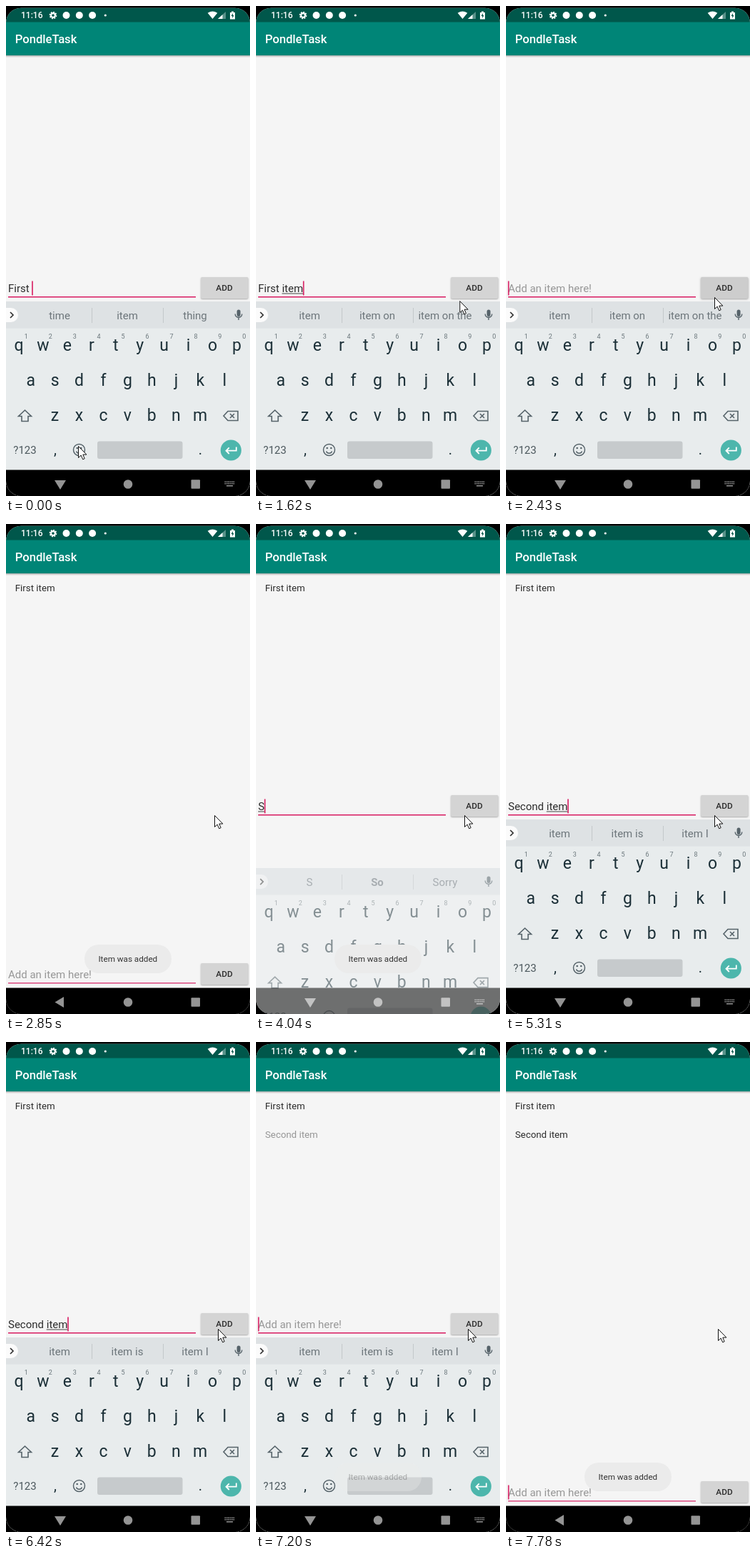
An HTML page with a canvas for the animation above (8000 ms loop, 342 by 685 pixels).

```html
<!DOCTYPE html>
<html lang="en">
<head>
<meta charset="utf-8">
<title>To-do list demo</title>
<style>
  html, body { margin: 0; width: 100%; height: 100%; overflow: hidden; background: #000; }
  canvas { display: block; }
</style>
</head>
<body>
<canvas id="stage" width="342" height="685"></canvas>
<script>
const ctx = document.getElementById('stage').getContext('2d');
const W = 342, H = 685, LOOP = 8000, BLINK = 470;
const PINK = '#d81b60', KEY = '#1b2f37', ICON = '#56636a', INK = '#2c2c2c';

// Times in ms: keyboard opens, first key press, gap between keys, item added.
// "given" letters stand in the field before the first key press.
const tasks = [
  { text: 'First item', open: -400, keys: 280, gap: 75, given: 6, add: 2310 },
  { text: 'Second item', open: 3920, keys: 3920, gap: 138, given: 0, add: 6840 }
];
const suggestions = {
  'First ': 'time|item|thing',
  'First item': 'item|item on|item on the',
  'S': 'S|*So|Sorry',
  'Second ': 'time|one|half',
  'Second item': 'item|item is|item I'
};
// Pointer moves after each added item and before each press: start, duration, dx, dy
const moves = [[1000, 740, 198, -218], [2300, 130, -7, 10], [6080, 340, 5, -6]];

const ramp = (t, start, span) => Math.min(1, Math.max(0, (t - start) / span));
const smooth = u => u * u * (3 - 2 * u);

function box(x, y, w, h, fill, r = 0) {
  ctx.fillStyle = fill;
  ctx.beginPath();
  ctx.roundRect(x, y, w, h, r);
  ctx.fill();
}
function disc(x, y, r, fill) {
  ctx.fillStyle = fill;
  ctx.beginPath();
  ctx.arc(x, y, r, 0, 7);
  ctx.fill();
}
function text(s, x, y, size, fill, align = 'left', weight = 400) {
  ctx.font = `${weight} ${size}px Roboto, sans-serif`;
  ctx.textAlign = align;
  ctx.fillStyle = fill;
  ctx.fillText(s, x, y);
}
// SVG path drawn at an offset, filled and/or stroked
function shape(x, y, d, fill, stroke, width = 1.6) {
  const p = new Path2D(d);
  ctx.save();
  ctx.translate(x, y);
  if (fill) { ctx.fillStyle = fill; ctx.fill(p); }
  if (stroke) { ctx.strokeStyle = stroke; ctx.lineWidth = width; ctx.stroke(p); }
  ctx.restore();
}

function drawTop() {
  box(0, 0, W, 23, '#00574b');
  box(0, 22.5, W, 46.5, '#008577');
  const shade = ctx.createLinearGradient(0, 69, 0, 72);
  shade.addColorStop(0, 'rgba(0,0,0,.3)');
  shade.addColorStop(1, 'rgba(0,0,0,0)');
  box(0, 69, W, 3, shade);
  text('PondleTask', 12.7, 52, 16.6, '#fff', 'left', 500);

  text('11:16', 21, 17, 12, '#fff', 'left', 500);
  ctx.setLineDash([2, 1.3]);
  shape(66, 13, 'M4.3 0A4.3 4.3 0 1 1-4.3 0A4.3 4.3 0 1 1 4.3 0', null, '#fff', 2);
  ctx.setLineDash([]);
  shape(66, 13, 'M2.9 0A2.9 2.9 0 1 1-2.9 0A2.9 2.9 0 1 1 2.9 0', null, '#fff', 2.2);
  for (let i = 0; i < 3; i++) disc(84.5 + 18.3 * i, 13, 5, '#fff');
  disc(139.3, 13, 1.6, '#fff');
  shape(289.5, 8, 'M-6.8 1.8Q0-2.6 6.8 1.8L0 10Z', '#fff');
  shape(297, 8, 'M11 0V10H0Z', 'rgba(255,255,255,.35)');
  shape(297, 8, 'M6.5 4V10H0Z', '#fff');
  shape(314, 7.5, 'M2 0H5V1.4H7V11H0V1.4H2Z', '#fff');
  shape(314, 7.5, 'M4 2.5L1.6 6.5H3.2V9.5L5.5 5.5H4Z', '#00574b');
}

function drawEntry(y, typed, wordStart, caretOn, press) {
  if (typed) text(typed, 3, y + 400, 15, INK);
  else text('Add an item here!', 3, y + 400, 15, '#979797');
  ctx.font = '400 15px Roboto, sans-serif';
  const edge = n => 3 + ctx.measureText(typed.slice(0, n)).width;
  const end = edge(typed.length);
  box(edge(wordStart), y + 401.5, end - edge(wordStart), 1, '#444');
  box(3, y + 406, 263, 1.5, y ? '#dc4a80' : PINK);
  if (caretOn) box(end - .2, y + 384.5, 1.6, 20, PINK);

  ctx.save();
  ctx.shadowColor = `rgba(0,0,0,${.3 + press})`;
  ctx.shadowBlur = 2 + press * 20;
  ctx.shadowOffsetY = 1;
  box(273, y + 379, 66.5, 30, '#d4d4d4', 2);
  ctx.restore();
  box(273, y + 379, 66.5, 30, `rgba(0,0,0,${press})`, 2);
  text('ADD', 306, y + 398, 11.8, INK, 'center', 500);
}

function drawKeyboard(drop, alpha, words) {
  ctx.save();
  ctx.globalAlpha = alpha;
  ctx.translate(0, drop);
  box(0, 413, W, H - 413, '#e8eced');
  box(0, 413, W, 37.5, '#dee2e4');
  box(-12, 422, 29, 20, '#fbfbfb', 10);
  shape(6, 428, 'M0 0L4 4L0 8', null, '#333', 1.7);
  words.split('|').forEach((w, i) => {
    if (i) box(20 + 100 * i, 422, 1, 21, '#c3c8ca');
    text(w.replace('*', ''), 75 + 95 * i, 437.5, 15, '#6c757a', 'center', w[0] === '*' ? 700 : 400);
  });
  box(323.6, 424.5, 5, 9.5, ICON, 2.5);
  shape(326, 430.5, 'M-4.8 0A4.8 4.8 0 0 0 4.8 0M0 5V8.5', null, ICON, 1.4);

  const spread = (row, x, y, size, fill) =>
    [...row].forEach((c, i) => text(c, x + 33.95 * i, y, size, fill, 'center'));
  spread('qwertyuiop', 18, 482, 23, KEY);
  spread('asdfghjkl', 34.7, 531, 23, KEY);
  spread('zxcvbnm', 68.5, 580, 23, KEY);
  spread('1234567890', 28.3, 465, 9, '#6a767b');

  shape(26.5, 573, 'M0-8L9 .5H4.5V7.5H-4.5V.5H-9Z', null, ICON);
  shape(315.5, 573, 'M-4.5-6.5H9.5V6.5H-4.5L-10.5 0ZM-1.5-3L4.5 3M4.5-3L-1.5 3', null, ICON);
  text('?123', 26.5, 626, 15, '#4b575c', 'center');
  text(',', 69, 627, 20, KEY, 'center');
  text('.', 272.5, 627, 20, KEY, 'center');
  shape(102.5, 620.5, 'M8 0A8 8 0 1 1-8 0A8 8 0 1 1 8 0M-4 2A4.3 4.3 0 0 0 4 2', null, ICON, 1.5);
  disc(99.7, 618, 1.3, ICON);
  disc(105.3, 618, 1.3, ICON);
  box(128, 608.5, 119.5, 24.5, '#c6cacc', 3);
  disc(315.3, 621, 14.6, '#4db6ac');
  shape(315.3, 621, 'M7.5-4.5V.7H-6.5M-2.5-3.7L-6.8 .7L-2.5 5', null, '#fff', 1.8);
  ctx.restore();
}

function drawNav(open, alpha) {
  const c = 'rgba(255,255,255,.58)';
  box(0, 648.6, W, 37, `rgba(0,0,0,${alpha})`);
  if (open) {
    shape(76, 663, 'M-8 0H8L0 13Z', c);
    for (let i = 0; i < 12; i++) box(306.5 + i % 6 * 2.4, i < 6 ? 664.5 : 667, 1.6, 1.6, c);
    box(309, 670, 9, 1.6, c);
  } else shape(68.5, 668.5, 'M0 0L12.5-7.5V7.5Z', c);
  disc(171, 668.5, 6.3, c);
  box(259.5, 662.3, 12.5, 12.5, c, 1);
}

function drawToast(alpha) {
  ctx.save();
  ctx.globalAlpha = alpha;
  box(110, 588, 122, 40, '#ebebeb', 20);
  text('Item was added', 170.8, 612, 11.7, '#333', 'center');
  ctx.restore();
}

function draw(t) {
  const task = tasks.findLast(k => k.open <= t);
  const { text: full, given, keys, gap } = task;
  const age = t - task.add, added = age >= 0;

  // Text in the field, the word being composed and its suggestions
  const pressed = Math.min(full.length - given, Math.max(0, Math.floor((t - keys) / gap) + 1));
  const line = full.slice(0, given + pressed);
  const wordStart = line.lastIndexOf(' ') + 1;
  const live = line.slice(wordStart), word = full.slice(wordStart).split(' ')[0];
  const words = suggestions[line] || `${live}|*${word}|${word}s`;
  const lastKey = added ? task.add : pressed ? keys + gap * (pressed - 1) : 0;
  const caretOn = (t - lastKey) % (2 * BLINK) < BLINK;

  const rise = ramp(t, task.open, 400), hide = ramp(age, 390, 150);
  const drop = 140 * (1 - rise) ** 2 + 30 * hide;

  ctx.save();
  box(0, 0, W, H, '#000');
  ctx.beginPath();
  ctx.roundRect(0, 2.7, W, H - 2.7, 21);
  ctx.clip();
  box(0, 0, W, H, '#f5f5f5');
  drawTop();
  tasks.forEach((k, i) => {
    ctx.globalAlpha = ramp(t, k.add + 290, 150);
    text(k.text, 12.7, 94 + 40 * i, 13.33, INK);
  });
  ctx.globalAlpha = 1;
  const press = .12 * Math.sin(Math.PI * ramp(age, -150, 300));
  drawEntry(hide === 1 ? 235 : 0, added ? '' : line, added ? 0 : wordStart, caretOn, press);
  drawKeyboard(drop, Math.min(1, rise / .6) * (1 - hide), words);
  drawNav(!hide, 1 - 2.2 * rise * (1 - rise));
  for (const k of tasks)
    drawToast(ramp(t, k.add + 300, 180) * (1 - ramp(t, k.add + 2030, 300)));
  ctx.restore();

  let x = 101.5, y = 615.5;
  for (const [start, span, dx, dy] of moves) {
    const u = smooth(ramp(t, start, span));
    x += dx * u;
    y += dy * u;
  }
  shape(x, y, 'M0 0V16L3.7 12.6L6.2 18.3L8.7 17.2L6.3 11.6H11.4Z', '#fff', '#111', 1);
}

function tick() {
  draw(performance.now() % LOOP);
  requestAnimationFrame(tick);
}
tick();
</script>
</body>
</html>
```
